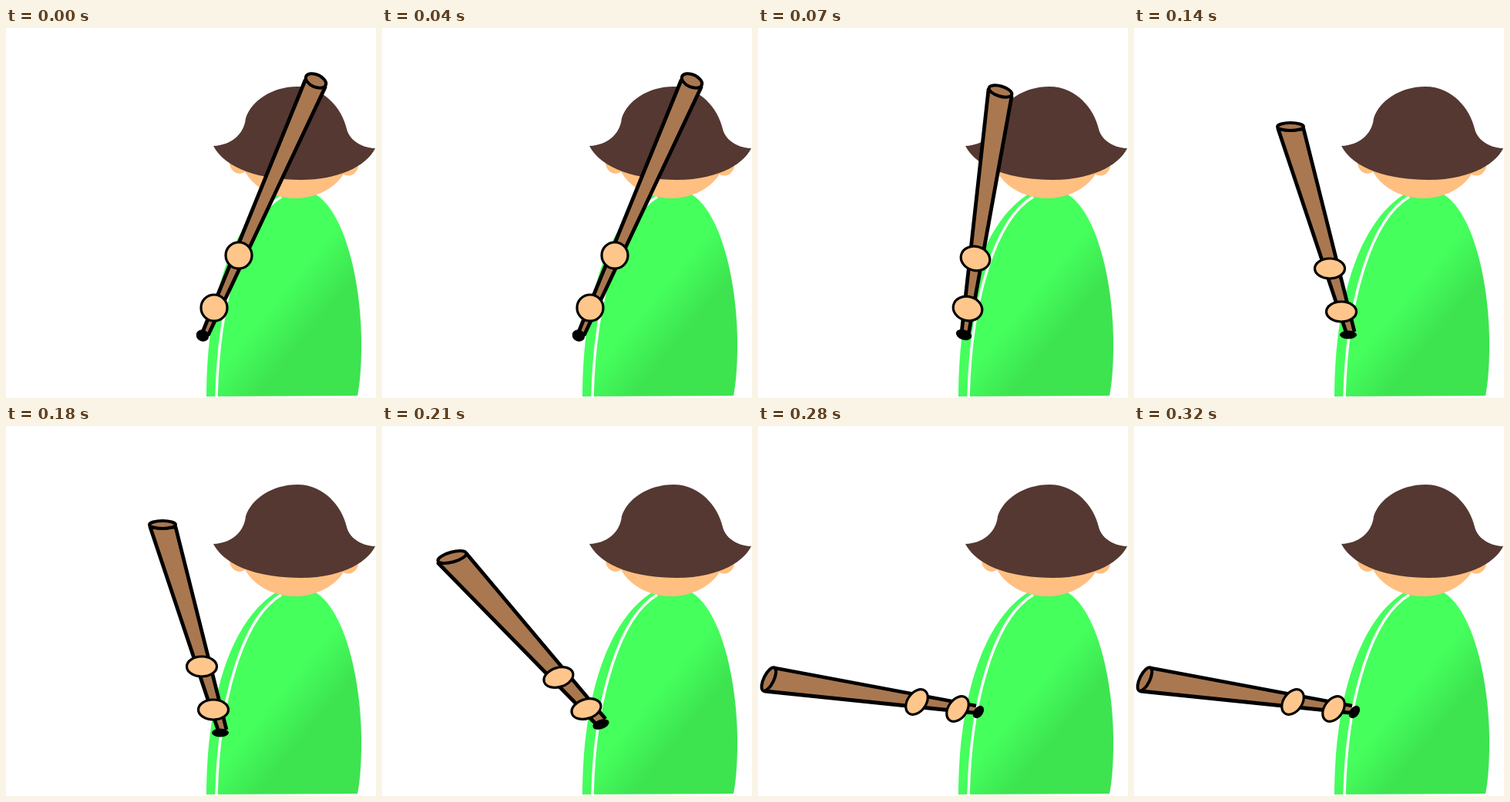
An HTML page for the animation above (350 ms loop, 480x480 px).

```html
<!DOCTYPE html>
<html lang="en">
<head>
<meta charset="utf-8">
<title>Bat swing</title>
<style>
html, body { margin: 0; width: 100%; height: 100%; overflow: hidden; background: #fff; }
svg { display: block; width: 100vw; height: 100vh; }
</style>
</head>
<body>
<svg viewBox="0 0 480 480">
  <defs>
    <linearGradient id="shirt" gradientUnits="userSpaceOnUse" x1="353" y1="350" x2="399" y2="388">
      <stop offset="0" stop-color="#45ff5d"/>
      <stop offset="1" stop-color="#3de450"/>
    </linearGradient>
  </defs>
  <path fill="url(#shirt)" d="M260 478C260 370 285 258 350 216H402C440 240 461 330 461 410C461 440 459 462 456 477Z"/>
  <path fill="none" stroke="#fff" stroke-width="3.5" d="M357 219C309 247 276 350 273 479"/>
  <g fill="#ffbf80">
    <ellipse cx="303" cy="174" rx="13" ry="15"/>
    <ellipse cx="444" cy="176" rx="13.5" ry="15.5"/>
    <ellipse cx="375" cy="160" rx="72" ry="61"/>
  </g>
  <path fill="#543831" d="M269 153C292 152 309 138 311 117C318 95 345 76 378 76C412 76 436 104 442 131C446 147 464 156 479 156C467 180 430 197 383 197C330 197 285 183 269 153Z"/>
  <g stroke="#000" stroke-linejoin="round">
    <path id="bat" fill="#a97850" stroke-width="4.8"/>
    <ellipse id="cap" fill="#a97850" stroke-width="4"/>
    <ellipse id="knob"/>
    <ellipse id="upper" fill="#ffc68c" stroke-width="3.2"/>
    <ellipse id="lower" fill="#ffc68c" stroke-width="3.2"/>
  </g>
</svg>
<script>
const STEP = 70;
// bat: corners from the handle up and back; cap, knob: x, y, rx, ry, angle;
// hands: two centres; grip: rx, ry, angle
const poses = [
  { bat: [254, 397, 388, 68, 414, 77, 262, 399], cap: [402, 68.5, 14, 8, 24],
    knob: [255, 399, 8, 7, 24], hands: [302, 295, 270, 363], grip: [17, 17, 0] },
  { bat: [264, 396, 299, 80, 329, 89, 273, 398], cap: [314.5, 82, 15.5, 6.5, 17],
    knob: [267, 398, 10, 6, 18], hands: [282, 299, 272, 364], grip: [19, 15.5, 15] },
  { bat: [275, 394, 187, 131, 220, 131, 286, 394], cap: [203, 128, 17, 5, 0],
    knob: [278, 398, 10.5, 5, 0], hands: [254, 312, 269, 368], grip: [19.5, 13, 0] },
  { bat: [277, 386, 73, 178, 110, 166, 290, 380], cap: [91, 170, 19, 6.5, -15],
    knob: [284, 387, 10.5, 5.5, -18], hands: [229, 326, 265, 367], grip: [19.5, 12.5, -18] },
  { bat: [283, 363, 22, 314, 9, 344, 280, 372], cap: [14, 328.5, 16.5, 6.5, -64],
    knob: [286, 371, 8.5, 5.5, -55], hands: [206, 358, 259, 367], grip: [18, 12, -55] }
];

const el = id => document.getElementById(id);

function oval(id, [cx, cy, rx, ry, angle]) {
  const attrs = { cx, cy, rx, ry, transform: `rotate(${angle} ${cx} ${cy})` };
  for (const key in attrs) el(id).setAttribute(key, attrs[key]);
}

function draw(time) {
  const pose = poses[Math.floor(time / STEP) % poses.length];
  const [ux, uy, lx, ly] = pose.hands;
  el("bat").setAttribute("d", `M${pose.bat.join(" ")}`);
  oval("cap", pose.cap);
  oval("knob", pose.knob);
  oval("upper", [ux, uy, ...pose.grip]);
  oval("lower", [lx, ly, ...pose.grip]);
}

const start = performance.now();
function tick() {
  draw(performance.now() - start);
  requestAnimationFrame(tick);
}
tick();
</script>
</body>
</html>
```
